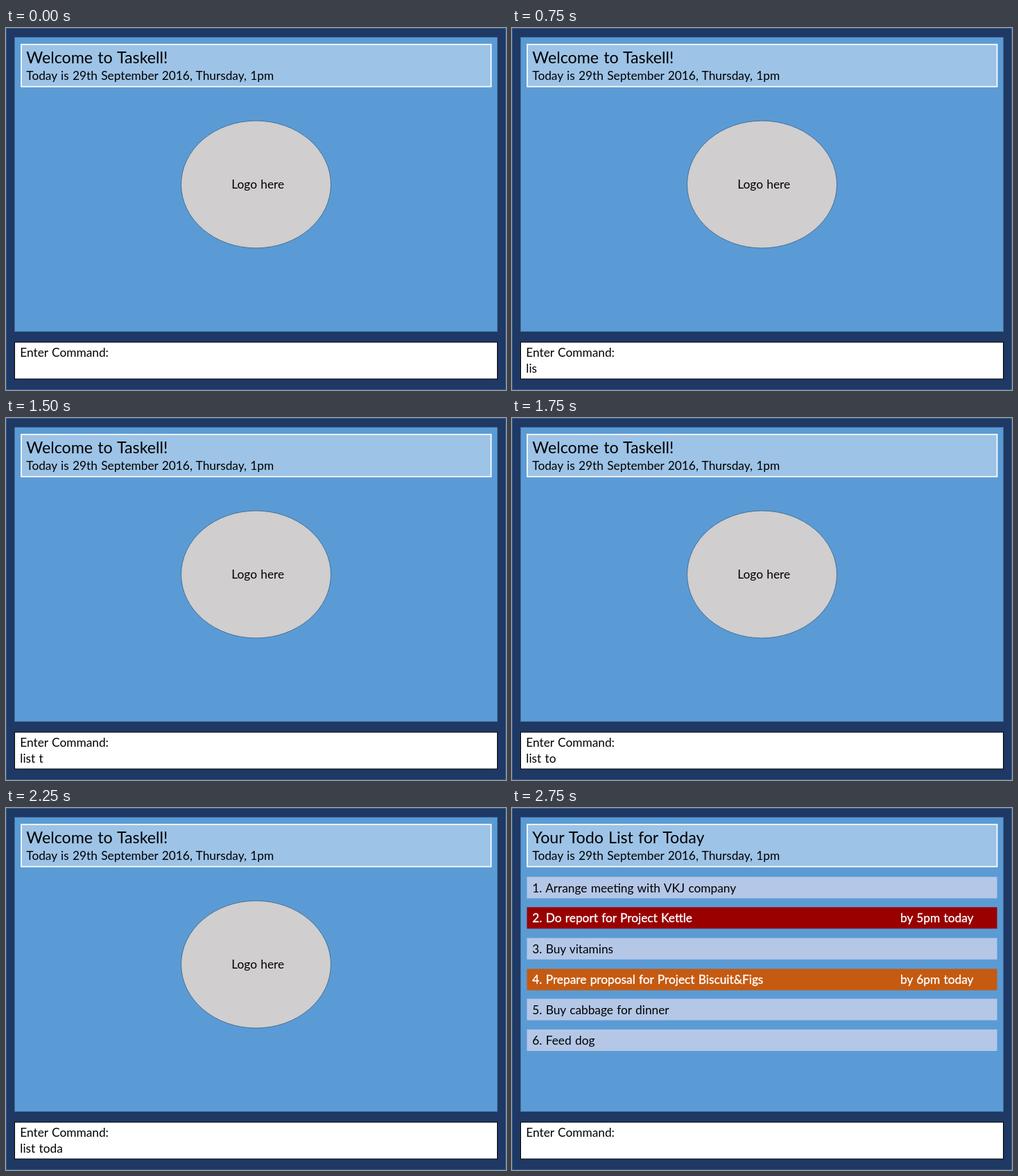
An HTML page that plays this animation: 721 px wide and 523 px high, repeating every 4.75 s.

```html
<!DOCTYPE html>
<html lang="en">
<head>
<meta charset="utf-8">
<title>Task list demo</title>
<style>
  html, body { margin: 0; width: 100%; height: 100%; overflow: hidden; background: #1f3864; }
  svg { display: block; width: 721px; height: 523px; }
  text { font: 17.3px Lato, "Open Sans", sans-serif; word-spacing: 0.9px; fill: #000; white-space: pre; }
  .title { font-size: 23.2px; word-spacing: 1.2px; }
  .urgent { fill: #fff; stroke: #fff; stroke-width: 0.35px; }
</style>
</head>
<body>
<svg viewBox="0 0 721 523">
  <rect x="0.5" y="0.5" width="720" height="522" fill="#1f3864" stroke="#2f5f91"/>
  <rect x="12.5" y="13.5" width="696" height="425" fill="#5b9bd5" stroke="#41719c"/>
  <rect x="22" y="23.7" width="677.5" height="61" fill="#9dc3e6" stroke="#fff" stroke-width="1.7"/>
  <text id="title" class="title" x="29.3" y="51"></text>
  <text x="29.3" y="75">Today is 29th September 2016, Thursday, 1pm</text>

  <g id="welcome">
    <ellipse cx="360.5" cy="226" rx="108" ry="92" fill="#d0cece" stroke="#41719c"/>
    <text x="325.3" y="232">Logo here</text>
  </g>
  <g id="tasks"></g>

  <rect x="12.5" y="454" width="696" height="53" fill="#fff" stroke="#000"/>
  <text x="20.3" y="475">Enter Command:</text>
  <text id="command" x="20.3" y="498"></text>
</svg>
<script>
const LOOP = 4750, KEY_TIME = 250, LIST_AT = 2750;
const COMMAND = "list today";
const PLAIN = "#b4c7e7";
const TASKS = [
  { y: 99.5, name: "Arrange meeting with VKJ company" },
  { y: 143.3, name: "Do report for Project Kettle", due: "by 5pm today", fill: "#990000" },
  { y: 187.8, name: "Buy vitamins" },
  { y: 232.4, name: "Prepare proposal for Project Biscuit&Figs", due: "by 6pm today", fill: "#c55a11" },
  { y: 275.6, name: "Buy cabbage for dinner" },
  { y: 320, name: "Feed dog" }
];

const byId = id => document.getElementById(id);
const title = byId("title"), welcome = byId("welcome");
const tasks = byId("tasks"), command = byId("command");

function add(tag, attrs, text = "") {
  const el = document.createElementNS(tasks.namespaceURI, tag);
  for (const key in attrs) el.setAttribute(key, attrs[key]);
  el.textContent = text;
  tasks.append(el);
}

TASKS.forEach(({ y, name, due, fill = PLAIN }, i) => {
  const cls = due ? "urgent" : "plain";
  add("rect", { x: 21.5, y, width: 678, height: 31, fill });
  add("text", { x: 29.3, y: y + 22, class: cls }, `${i + 1}. ${name}`);
  if (due) add("text", { x: 560, y: y + 22, class: cls }, due);
});

function draw(t) {
  const listed = t >= LIST_AT;
  title.textContent = listed ? "Your Todo List for Today" : "Welcome to Taskell!";
  welcome.style.display = listed ? "none" : "";
  tasks.style.display = listed ? "" : "none";
  // The space takes a keystroke too, so the text appears to pause there.
  command.textContent = listed ? "" : COMMAND.slice(0, Math.floor(t / KEY_TIME));
}

const start = performance.now();
function tick() {
  draw((performance.now() - start) % LOOP);
  requestAnimationFrame(tick);
}
tick();
</script>
</body>
</html>
```
